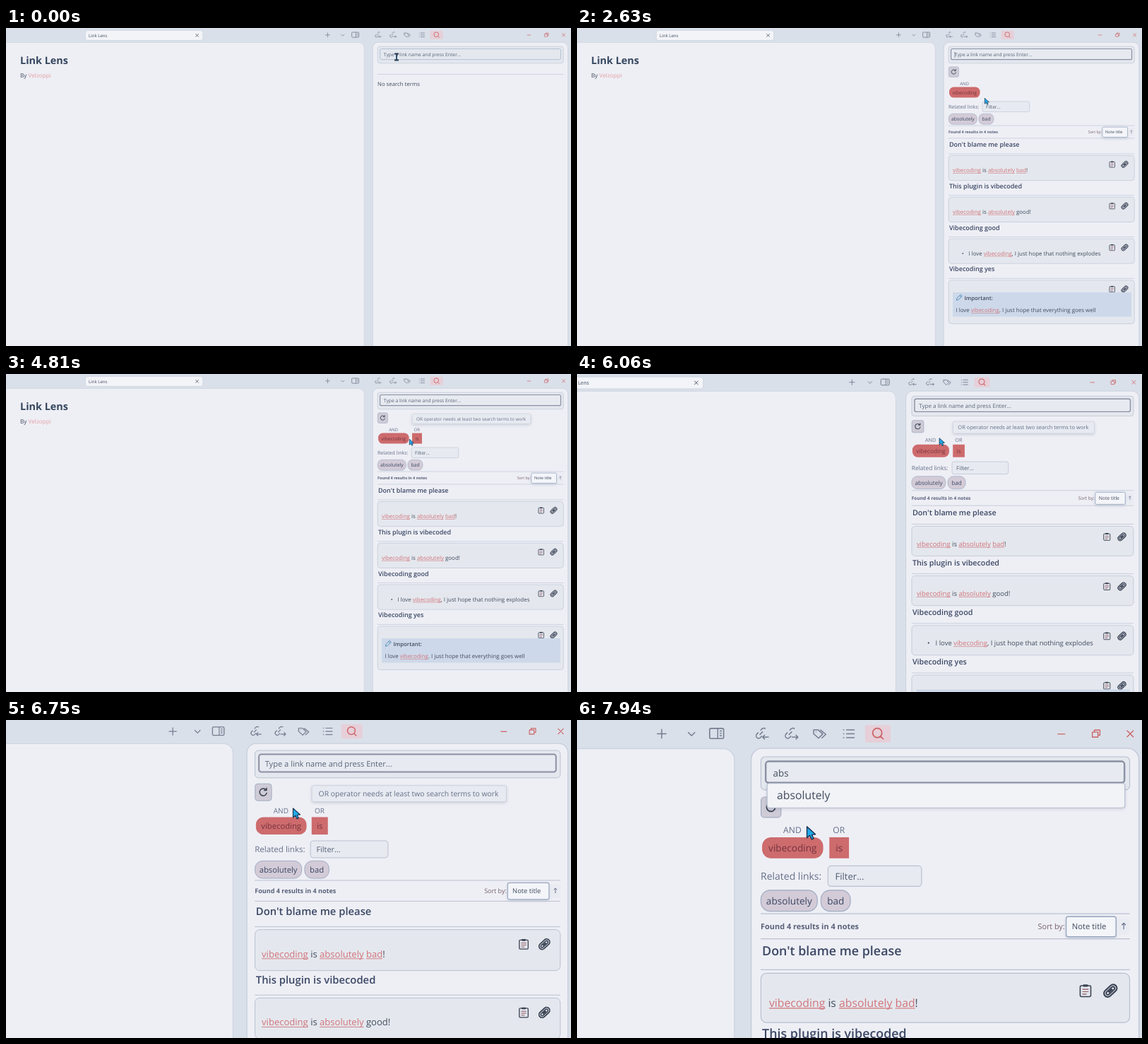
Recreate the animation shown at these times as an HTML page with a canvas. Size 800 by 450 pixels, loop 8 s.

```html
<!DOCTYPE html>
<html lang="en">
<head>
<meta charset="utf-8">
<title>Link Lens</title>
<style>
html, body { margin: 0; width: 100%; height: 100%; overflow: hidden; background: #dae0e9; }
canvas { display: block; }
</style>
</head>
<body>
<canvas id="stage" width="800" height="450"></canvas>
<script>
const ctx = document.getElementById('stage').getContext('2d');
const LOOP = 8000;
const C = {
  bar: '#dae0e9', page: '#eeeff5', card: '#e4e8ee', edge: '#b8c0d0', text: '#434c5e', head: '#3b4764',
  muted: '#66708a', icon: '#747d90', red: '#cb6568', link: '#d2737a', chip: '#d3cbd7', chipEdge: '#9fadc4',
  term: '#cd6b6d', termText: '#74343f',
};

// Keyframes: [time, value, value...]
const ZOOM = [[5710, 1], [6060, 1.193], [6750, 1.643], [7190, 1.943], [7310, 1.985]];
const POINTER = [[80, 553, 41], [600, 577, 99], [4050, 577, 99], [4350, 582, 79], [4650, 582, 79],
  [4810, 571, 92], [5200, 558.7, 75.7]];
// What the search field holds from each time on
const TYPED = [[0, ''], [350, 'v'], [480, 'vi'], [610, 'vib'], [740, 'vibe'], [1100, ''],
  [3000, 'i'], [3150, 'is'], [3550, ''], [6850, 'a'], [6970, 'ab'], [7090, 'abs']];
const RESULTS_AT = 1100, SECOND_TERM_AT = 3550, OR_AT = 4450, TIP_END = 7450, FOCUS_AT = 200;

function track(keys, t) {
  const next = keys.findIndex(k => k[0] > t);
  if (next === 0) return keys[0].slice(1);
  if (next < 0) return keys[keys.length - 1].slice(1);
  const a = keys[next - 1], b = keys[next], p = (t - a[0]) / (b[0] - a[0]);
  return a.slice(1).map((v, i) => v + (b[i + 1] - v) * p);
}

function box(x, y, w, h, r, fill, edge, width = 0.6) {
  ctx.beginPath();
  ctx.roundRect(x, y, w, h, r);
  if (fill) { ctx.fillStyle = fill; ctx.fill(); }
  if (edge) { ctx.strokeStyle = edge; ctx.lineWidth = width; ctx.stroke(); }
}

function path(d, color, width = 0.75, fill) {
  const p = new Path2D(d);
  if (fill) { ctx.fillStyle = fill; ctx.fill(p); }
  ctx.strokeStyle = color;
  ctx.lineWidth = width;
  ctx.stroke(p);
}

function at(x, y, draw, angle = 0) {
  ctx.save();
  ctx.translate(x, y);
  ctx.rotate(angle);
  draw();
  ctx.restore();
}

function text(s, x, y, size, color = C.text, weight = 400, align = 'left') {
  ctx.font = `${weight} ${size}px "Open Sans", "Noto Sans", sans-serif`;
  ctx.textAlign = align;
  ctx.fillStyle = color;
  ctx.fillText(s, x, y);
  return ctx.measureText(s).width;
}

// Words in [brackets] are underlined links
function richText(s, x, y) {
  for (const part of s.split(/(\[.*?\])/)) {
    const isLink = part[0] === '[';
    const w = text(isLink ? part.slice(1, -1) : part, x, y, 7.95, isLink ? C.link : C.text);
    if (isLink) rule(x, y + 1.2, x + w, C.link, 0.55);
    x += w;
  }
}

const rule = (x1, y, x2 = 789.3, color = C.edge, width = 0.6) => path(`M${x1} ${y}H${x2}`, color, width);

function shadowed(draw) {
  ctx.save();
  ctx.shadowColor = 'rgba(60,75,105,.22)';
  ctx.shadowBlur = 4;
  ctx.shadowOffsetY = 1.5;
  draw();
  ctx.restore();
}

function linkIcon(x, arrow) {
  at(x, 9.4, () => {
    at(0, 0, () => path('M-1 -1.8H-2.6A1.8 1.8 0 0 0 -2.6 1.8H-1M1 -1.8H2.6A1.8 1.8 0 0 1 4.4 0M-1.6 0H1.6', C.icon), -0.8);
    path(arrow < 0 ? 'M5.4 2.8H1M2.6 1.2L1 2.8L2.6 4.4' : 'M1 2.8H5.4M3.8 1.2L5.4 2.8L3.8 4.4', C.icon);
  });
}

function titleBar() {
  box(112.4, 3.5, 166.4, 14, 3.5, '#f2f4f8', '#c3cbd9', 0.5);
  text('Link Lens', 117, 12.7, 6.1);
  path('M268.4 8.2L272.8 12.6M272.8 8.2L268.4 12.6', C.text, 0.8);
  path('M452 9.8H458.8M455.4 6.4V13.2', C.icon);
  path('M474.2 8.7L476.7 11.2L479.2 8.7', C.icon);
  box(489.6, 6, 10, 7.2, 1, null, C.icon, 0.8);
  path('M495.4 6V13.2M496.7 7.8H498.3M496.7 9.5H498.3M496.7 11.2H498.3', C.icon, 0.7);
  linkIcon(526.4, -1);
  linkIcon(547.2, 1);
  path('M563.8 7H567L570.3 10L567.3 13L563.8 9.8ZM568.5 7L572.5 10.2L569.5 13M565.3 8.5H565.8', C.icon);
  path('M584.8 7H585.6M584.8 9.8H585.6M584.8 12.6H585.6M587 7H593M587 9.8H593M587 12.6H593', C.icon);
  box(600.5, 3.7, 18.2, 12.3, 1.5, '#e6cfd8');
  path('M612.5 9.2A3.3 3.3 0 1 1 605.9 9.2A3.3 3.3 0 1 1 612.5 9.2M611.5 11.6L613.6 13.7', C.red, 0.9);
  path('M737.8 10H743.2M762.6 8.6H766.6V12.2H762.6ZM764 8.6V7.2H768V10.8H766.6M787.2 7.4L792 12.2M792 7.4L787.2 12.2', C.red, 0.7);
}

function pages() {
  box(-20, 20.4, 527.3, 500, 8, C.page, '#ccd3df', 0.7);
  box(519.2, 20.2, 276.6, 500, 8, C.page, '#c3cad9', 0.7);
  text('Link Lens', 20, 51, 14.4, '#35465f', 700);
  const w = text('By ', 20, 70.4, 8.2);
  text('Velzoppi', 20 + w, 70.4, 8.2, '#e2a0a5');
}

function chip(label, x, w, y, r, fill, edge, color) {
  box(x, y, w, 15, r, fill, edge);
  text(label, x + w / 2, y + 10.1, 6.85, color, 400, 'center');
}

function clipboard(x, y) {
  at(x, y, () => {
    box(-3.8, -3.6, 7.6, 7.8, 0.8, null, '#3b4252', 0.8);
    box(-1.8, -4.4, 3.6, 1.6, 0.5, '#3b4252');
    path('M-2.2 -1H2.2M-2.2 .7H2.2M-2.2 2.4H.8', '#8a5260', 0.6);
  });
}

function chain(x, y) {
  at(x, y, () => {
    box(-5.4, -2.7, 10.8, 5.4, 2.7, '#a9afbc', '#333b4c', 0.9);
    box(-3.6, -1.1, 7.2, 2.2, 1.1, C.card, '#333b4c', 0.8);
    path('M-1.8 0H1.8', '#333b4c', 1.3);
  }, -0.75);
}

function result(index, title, body) {
  const y = index * 58.8, last = index === 3;
  text(title, 527, 167.9 + y, 9, C.head, 600);
  rule(526, 178 + y);
  box(526.2, 180.5 + y, 263, last ? 61.6 : 35.2, 4, C.card, C.edge);
  clipboard(757.7, 193 + y);
  chain(775.5, 193 + y);
  if (last) {
    box(532, 374, 253, 34.6, 1, '#cdd9ea');
    path('M537.3 385.2L538 382.2L543.2 377.4L545.4 379.4L540.2 384.4ZM541.8 378.7L544 380.7', '#3f7fae', 0.8);
    text('Important:', 548.4, 384.7, 7.8, C.text, 600);
    richText(body, 536.4, 402.4);
  } else if (index === 2) {
    text('•', 544.7, 321.9, 8);
    richText(body, 554.4, 321.9);
  } else {
    richText(body, 532, 204.3 + y);
  }
}

function searchField(typed, focused, caret) {
  box(526.2, 26.2, 263, 23.6, 3, C.card, C.edge);
  box(529.6, 29.5, 255.9, 15.2, 2, focused ? '#e7eaf0' : C.card, focused ? '#8b90a3' : '#9fb0c9', focused ? 1.2 : 0.7);
  text(typed || 'Type a link name and press Enter...', 534.8, 40.3, 6.75, typed ? C.text : '#596478');
  if (caret) path('M535 34V42', C.text, 0.6);
}

function searchTerms(t) {
  box(526.3, 54.9, 14.2, 14.6, 2.3, '#cecbd7', '#a3adc1');
  path('M535.8 60.2A3.1 3.1 0 1 0 536.4 62.6M536.2 58.2V60.6H533.8', '#3b4252', 0.9);
  text('AND', 548.6, 80.6, 6.1, C.muted, 400, 'center');
  chip('vibecoding', 527, 43.6, 83.6, 6.5, C.term, null, C.termText);
  if (t >= SECOND_TERM_AT) {
    text(t < OR_AT ? 'AND' : 'OR', 581.8, 80.6, 6.1, C.muted, 400, 'center');
    chip('is', 575, 14, 83.6, 0, C.term, null, C.termText);
  }
  text('Related links:', 526, 113.8, 7.05, C.muted);
  box(574, 104, 66.8, 14.6, 2.3, '#e7eaf0', C.edge);
  text('Filter...', 579.1, 113.8, 6.6, '#535e73');
  chip('absolutely', 526.2, 40.2, 121.3, 6.5, C.chip, C.chipEdge, C.head);
  chip('bad', 569, 21, 121.3, 6.5, C.chip, C.chipEdge, C.head);
}

function resultList() {
  rule(526, 138.1);
  text('Found 4 results in 4 notes', 526, 149, 5.5, '#59617a', 700);
  text('Sort by:', 723.7, 149, 5.45, '#775f70');
  shadowed(() => box(743.9, 140.2, 35.6, 14.3, 1.5, '#f3f5f9'));
  box(743.9, 140.2, 35.6, 14.3, 1.5, null, '#98a6c0', 0.7);
  text('Note title', 748, 149, 5.7);
  box(781, 141.5, 8, 11.5, 1.5, '#e9ebf2');
  path('M785 149.2V144.8M783.6 146.2L785 144.8L786.4 146.2', C.muted, 0.6);
  rule(526, 156);
  result(0, "Don't blame me please", '[vibecoding] is [absolutely] [bad]!');
  result(1, 'This plugin is vibecoded', '[vibecoding] is [absolutely] good!');
  result(2, 'Vibecoding good', 'I love [vibecoding], I just hope that nothing explodes');
  result(3, 'Vibecoding yes', 'I love [vibecoding]. I just hope that everything goes well');
}

function suggestion(label) {
  shadowed(() => box(530.6, 45.2, 255.2, 17.4, 1.5, '#f1f3f7'));
  box(530.6, 45.2, 255.2, 17.4, 1.5, null, C.edge);
  text(label, 537.6, 56.5, 7.95);
}

function tooltip() {
  shadowed(() => box(575.2, 56.4, 167.6, 14, 1.5, '#e7eaf0'));
  box(575.2, 56.4, 167.6, 14, 1.5, null, '#c6cedb', 0.5);
  text('OR operator needs at least two search terms to work', 581, 65.5, 6.32, C.muted);
}

function pointer(t) {
  const [x, y] = track(POINTER, t);
  at(x, y, () => {
    if (y < 47) {
      path('M-3 -4.5H3M-3 4.5H3M0 -4.5V4.5', '#26384f', 2);
      path('M0 -3.5V3.5', '#3f86b5', 0.7);
    } else {
      path('M.3 .3V8.3L2.3 6.6L3.7 9.4L5.1 8.7L3.8 6.1L6.4 5.8Z', '#1d3350', 0.7, '#22a9e8');
    }
  });
}

function draw(t) {
  const [zoom] = track(ZOOM, t);
  const typed = TYPED.filter(k => k[0] <= t).pop()[1];
  const caret = !typed && t >= RESULTS_AT && t < 3000 && t % 1060 < 530;

  ctx.setTransform(1, 0, 0, 1, 0, 0);
  ctx.fillStyle = C.bar;
  ctx.fillRect(0, 0, 800, 450);
  ctx.setTransform(zoom, 0, 0, zoom, 796 * (1 - zoom), 0); // anchored at the top right
  ctx.textRendering = 'geometricPrecision';
  ctx.lineJoin = 'round';

  titleBar();
  pages();
  searchField(typed, t >= FOCUS_AT, caret);
  if (t < RESULTS_AT) {
    rule(526, 65.5);
    text('No search terms', 526, 82.2, 7.8);
  } else {
    searchTerms(t);
    resultList();
  }
  if (typed[0] === 'v') suggestion('vibecoding');
  if (typed[0] === 'a') suggestion('absolutely');
  if (t >= OR_AT && t < TIP_END) tooltip();
  pointer(t);
}

function frame() {
  draw(performance.now() % LOOP);
  requestAnimationFrame(frame);
}
frame();
</script>
</body>
</html>
```
